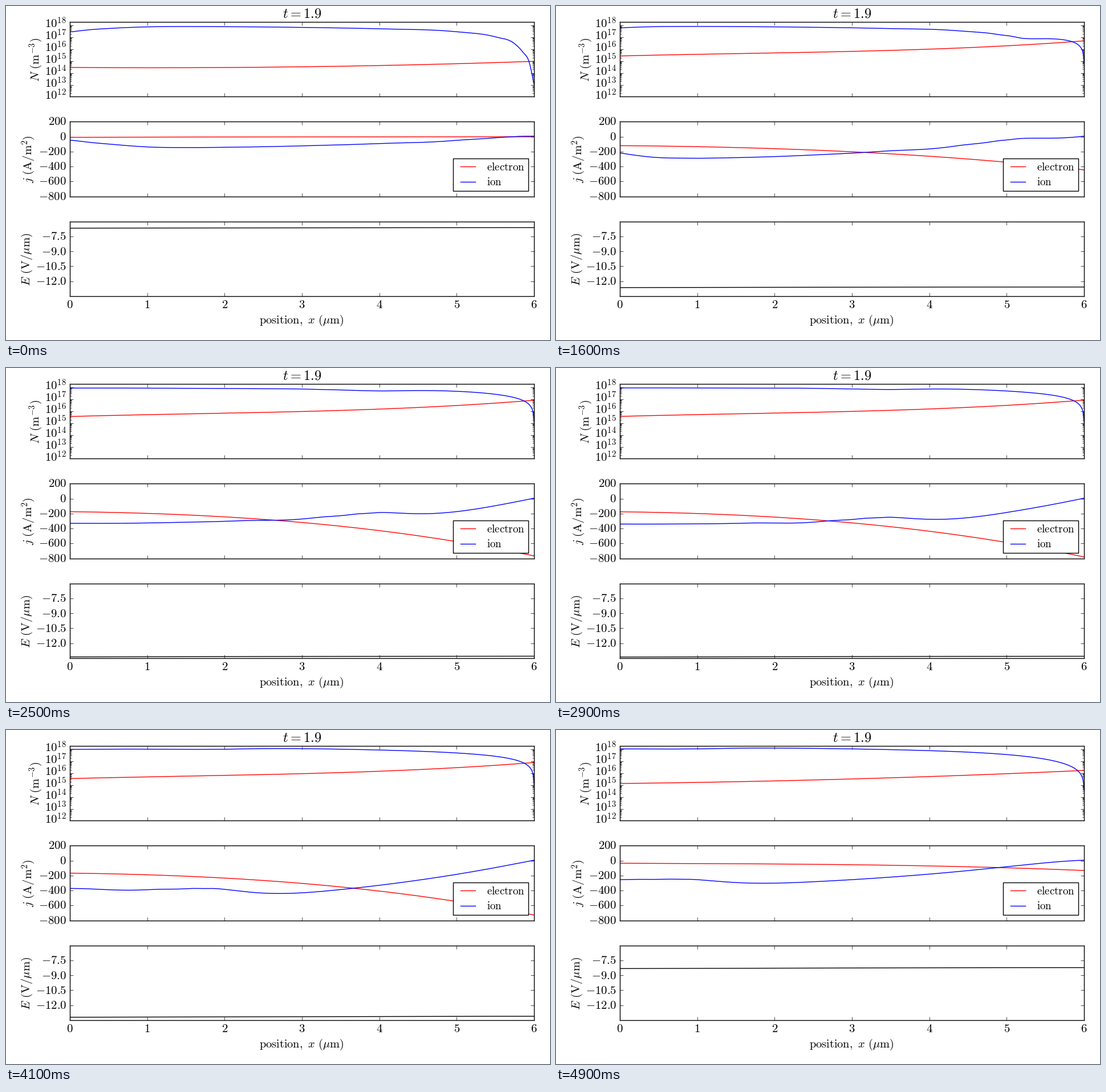
Write a matplotlib script that moves like this. It is 954 px wide and 587 px high and loops after 5 s.

```python
import matplotlib.pyplot as plt
import numpy as np
from matplotlib.animation import FuncAnimation
from matplotlib.lines import Line2D
from matplotlib.patches import Rectangle
from matplotlib.ticker import LogLocator, NullFormatter

plt.rcParams["mathtext.fontset"] = "cm"

W, H, DPI = 954, 587, 100
FRAMES, INTERVAL = 50, 100
START = 10                    # the first state is held until this step
LEFT, WIDTH, HEIGHT = 112, 814, 131.4
TOPS = [28, 203.3, 378.6]
RED, BLUE = (1, 0, 0), (0, 0, 1)

# ---------- physics ----------
LENGTH = 6.0
DRIFT = 0.010                 # ion travel in um per step per V/um
FLUX = 2.82e-17               # ion current per density per V/um
CHARGE = 1.81e-20             # field slope per ion density
SUBSTEPS = 4
x = np.linspace(0, LENGTH, 1201)

# Electron state at a few steps; values in between follow the field.
KEYS = np.array([10, 11, 21, 29, 37, 45, 49])
CURRENT_X = [0, 2, 4, 6]
CURRENT = np.array([
    [9, 5, 3, 2],
    [15, 16, 18, 22],
    [172, 239, 415, 745],
    [176, 247, 436, 780],
    [176, 247, 433, 778],
    [134, 184, 314, 546],
    [35, 45, 71, 132],
])
DENSITY_X = [0, 3, 5, 6]
DENSITY = 12 + np.array([
    [2.463, 2.520, 2.779, 2.980],
    [2.798, 2.976, 3.277, 3.531],
    [3.541, 3.963, 4.461, 4.907],
    [3.565, 3.987, 4.494, 4.940],
    [3.565, 3.985, 4.490, 4.930],
    [3.479, 3.867, 4.379, 4.796],
    [3.134, 3.517, 3.958, 4.236],
])
# Initial ion density (log10)
ION_X = [0, 0.25, 0.5, 1, 1.5, 2, 3, 4, 5, 5.5, 5.75, 5.85, 5.94, 6]
ION_LOG = [17.45, 17.64, 17.75, 17.885, 17.91, 17.90, 17.84, 17.72,
           17.47, 17.04, 16.46, 15.80, 14.85, 13.05]


def field(step):
    """Mean field of the smooth voltage pulse centred on step 30."""
    d = np.abs(np.asarray(step, float) - 30)
    return -13.34 + 14.73 / (1 + 1.2 * np.exp(0.46 * (20 - d)))


def hermite(t, xs, ys):
    xs, ys = np.array(xs), np.array(ys)
    slope = np.gradient(ys, xs)
    i = np.clip(np.searchsorted(xs, t) - 1, 0, len(xs) - 2)
    h = xs[i + 1] - xs[i]
    u = (t - xs[i]) / h
    return ((1 + 2 * u) * (1 - u) ** 2 * ys[i] + u * (1 - u) ** 2 * h * slope[i]
            + u * u * (3 - 2 * u) * ys[i + 1] + u * u * (u - 1) * h * slope[i + 1])


# Clock that runs fast while the field changes and slowly on the plateau
ticks = np.arange(START, FRAMES - 1 + 0.5 / SUBSTEPS, 1 / SUBSTEPS)
clock = np.concatenate(
    [[0], np.cumsum(np.abs(np.diff(field(ticks))) + 0.02 / SUBSTEPS)])
key_clock = np.interp(KEYS, ticks, clock)


def cubic_at(step, nodes, table):
    c = np.interp(step, ticks, clock)
    return np.polyfit(nodes, [np.interp(c, key_clock, col) for col in table.T], 3)


def electron_current(step):
    """Cubic coefficients of the electron current magnitude."""
    c = np.interp(step, ticks, clock)
    logs = [np.interp(c, key_clock, col) for col in np.log(CURRENT).T]
    return np.polyfit(CURRENT_X, np.exp(logs), 3)


def ion_history():
    """Ions drift to the left while the electron avalanche makes new ones."""
    f = FLUX * 10 ** hermite(x, ION_X, ION_LOG)
    states = {START: f}
    dt = 1 / SUBSTEPS
    for i in range(1, len(ticks)):
        e = -float(field(ticks[i] - dt / 2))
        growth = np.polyder(electron_current(ticks[i]))
        gain = np.maximum(np.polyval(growth, x), 0)
        age = np.minimum(dt, (LENGTH - x) / (DRIFT * e))
        edge = 0.002 * gain[-1] / e
        f = np.interp(x + DRIFT * e * dt, x, f, right=edge) + DRIFT * gain * age
        if i % SUBSTEPS == 0:
            states[START + i // SUBSTEPS] = f
    return states


ions = ion_history()

# ---------- layout ----------
# The small margin keeps the pixel size from being rounded down.
fig = plt.figure(figsize=((W + 0.01) / DPI, (H + 0.01) / DPI), dpi=DPI,
                 facecolor="white")


def label(px, py, text, size=15, ha="center", **kw):
    return fig.text(px / W, 1 - py / H, text, fontsize=size, ha=ha,
                    va="baseline", rotation_mode="anchor", **kw)


def panel(top, low, high, yticks):
    ax = fig.add_axes([LEFT / W, 1 - (top + HEIGHT) / H, WIDTH / W, HEIGHT / H])
    if yticks is None:
        ax.set_yscale("log")
        ax.yaxis.set_major_locator(LogLocator(10, numticks=20))
        ax.yaxis.set_minor_locator(LogLocator(10, subs=range(2, 10), numticks=20))
        ax.yaxis.set_minor_formatter(NullFormatter())
    else:
        ax.set_yticks(yticks)
    ax.set_xlim(0, LENGTH)
    ax.set_ylim(low, high)
    ax.set_xticks(range(7))
    ax.tick_params(which="both", direction="in", top=True, right=True, width=0.5,
                   labelleft=False, labelbottom=False)
    ax.tick_params(which="major", length=4)
    ax.tick_params(which="minor", length=2)
    for spine in ax.spines.values():
        spine.set_linewidth(1)
    return ax


def curve(ax, color):
    return ax.plot([], [], color=color, lw=1)[0]


j_ticks = range(-800, 201, 200)
e_ticks = [-12, -10.5, -9, -7.5]
ax_n = panel(TOPS[0], 1e12, 2e18, None)
ax_j = panel(TOPS[1], -800, 200, j_ticks)
ax_e = panel(TOPS[2], -13.5, -6, e_ticks)

right = 106
for p in range(12, 19):
    y = TOPS[0] + HEIGHT * (1 - (p - 12) / np.log10(2e6))
    label(right, y + 5, f"$10^{{{p}}}$", ha="right")
for v in j_ticks:
    label(right, TOPS[1] + HEIGHT * (200 - v) / 1000 + 6, f"${v}$", ha="right")
for v in e_ticks:
    label(right, TOPS[2] + HEIGHT * (-6 - v) / 7.5 + 6.5, f"${v:.1f}$", ha="right")
for v in range(7):
    label(LEFT + WIDTH * v / 6, 531, f"${v}$")

middle = LEFT + WIDTH / 2
label(middle, 20.5, "$t=1.9$", size=17.5)
label(middle - 1, 558, r"$\mathrm{position,}\ x\ (\mu\mathrm{m})$", size=14.7)
names = [(59, r"$N\ (\mathrm{m}^{-3})$"),
         (46, r"$j\ (\mathrm{A/m}^{2})$"),
         (41.5, r"$E\ (\mathrm{V/}\mu\mathrm{m})$")]
for top, (px, text) in zip(TOPS, names):
    label(px, top + HEIGHT / 2 + 0.5, text, rotation=90)

n_electron, n_ion = curve(ax_n, RED), curve(ax_n, BLUE)
j_electron, j_ion = curve(ax_j, RED), curve(ax_j, BLUE)
e_line = curve(ax_e, "black")

fig.add_artist(Rectangle((784 / W, 1 - 325 / H), 132 / W, 57 / H, fc="white",
                         ec="black", lw=1, transform=fig.transFigure))
for y, color, name in [(282.5, RED, "electron"), (309, BLUE, "ion")]:
    fig.add_artist(Line2D([796.5 / W, 823 / W], [1 - y / H] * 2, color=color, lw=1,
                          transform=fig.transFigure))
    label(843, y + 6, rf"$\mathrm{{{name}}}$", size=13.7, ha="left")


# ---------- animation ----------
def draw(frame):
    step = max(frame, START)
    f = ions[step]
    density = f / FLUX
    mean = float(field(step))
    bend = np.cumsum(density) * CHARGE * (x[1] - x[0])

    n_electron.set_data(x, 10 ** np.polyval(cubic_at(step, DENSITY_X, DENSITY), x))
    n_ion.set_data(x, density)
    j_electron.set_data(x, -np.polyval(electron_current(step), x))
    j_ion.set_data(x, mean * f + 6)
    e_line.set_data(x, mean + bend - bend.mean())
    return n_electron, n_ion, j_electron, j_ion, e_line


anim = FuncAnimation(fig, draw, frames=FRAMES, interval=INTERVAL,
                     repeat=True, repeat_delay=0, blit=False)
plt.show()
```
